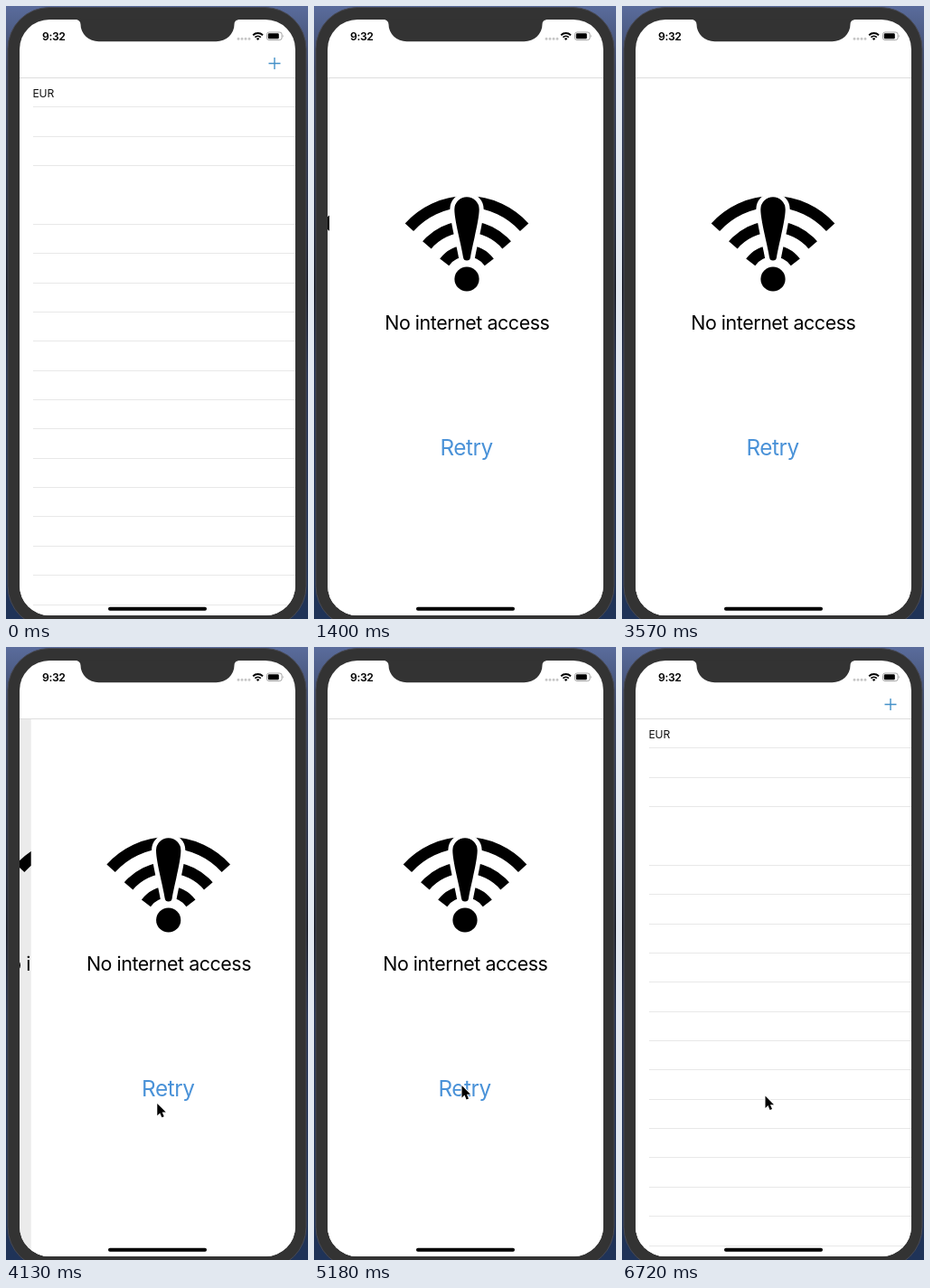
Recreate the animation shown at these times as an HTML page. Size 334x678 px, loop 6.79 s.

```html
<!DOCTYPE html>
<html lang="en">
<head>
<meta charset="utf-8">
<title>Connection retry</title>
<style>
  html, body { margin: 0; width: 100%; height: 100%; overflow: hidden; background: #252e46; }
  svg { display: block; width: 334px; height: 678px; font-family: Inter, Roboto, sans-serif; font-optical-sizing: none; }
  .clock { font-size: 12.2px; font-weight: 600; letter-spacing: -.03em; }
  .row { font-size: 12.1px; letter-spacing: -.015em; }
  .message { font-size: 21.4px; letter-spacing: -.0205em; text-anchor: middle; }
  .retry { font-size: 24.3px; letter-spacing: -.018em; text-anchor: middle; fill: #4a92d8; opacity: var(--press, 1); }
</style>
</head>
<body>
<svg viewBox="0 0 334 678">
  <defs>
    <linearGradient id="wallpaper" x2="0" y2="1">
      <stop offset="0" stop-color="#5a6c9c"/>
      <stop offset=".1" stop-color="#3c4868"/>
      <stop offset=".35" stop-color="#222a40"/>
      <stop offset=".46" stop-color="#141824"/>
      <stop offset=".6" stop-color="#263455"/>
      <stop offset="1" stop-color="#1f3358"/>
    </linearGradient>
    <clipPath id="screen"><rect x="15" y="15" width="305" height="659" rx="33"/></clipPath>
    <clipPath id="content"><rect x="15" y="80" width="305" height="594"/></clipPath>

    <g id="list">
      <rect x="15" y="80" width="305" height="594" fill="#fff"/>
      <text class="row" x="29.5" y="100.5" fill="#111">EUR</text>
      <path id="rules" stroke="#e8e8e8"/>
    </g>

    <g id="error">
      <rect x="15" y="80" width="305" height="594" fill="#fff"/>
      <g id="arcs" fill="none" stroke="#000" stroke-width="12.6"></g>
      <g stroke="#fff" stroke-width="10" paint-order="stroke">
        <path d="M153.3 225a13.7 13.7 0 0 1 27.4 0C180.7 237 173 265 171 278Q170.5 281.5 167 281.5T163 278C161 265 153.3 237 153.3 225Z"/>
        <circle cx="167" cy="302" r="13.6"/>
      </g>
      <text class="message" x="167.3" y="358">No internet access</text>
      <text class="retry" x="166.6" y="497">Retry</text>
    </g>
  </defs>

  <rect width="334" height="678" fill="url(#wallpaper)"/>
  <rect x="2" y="1.5" width="330" height="686" rx="46" fill="#333" stroke="#484a55"/>

  <g clip-path="url(#screen)">
    <rect x="15" y="15" width="305" height="659" fill="#fff"/>
    <g clip-path="url(#content)">
      <use id="under"/>
      <rect id="dim" x="15" y="80" width="305" height="594"/>
      <use id="over"/>
    </g>
    <path d="M15 79.5H320" stroke="#dedede"/>
    <path id="plus" d="M290.5 63.5h13M297 57v13" stroke="#4390c8" stroke-width="1.4"/>
  </g>

  <path d="M75 14.5Q82.5 15 82.5 20.3A20 19 0 0 0 102.5 39.3H232.5A20 19 0 0 0 252.5 20.3Q252.5 15 260 14.5Z" fill="#333"/>

  <text class="clock" x="40" y="37.8">9:32</text>
  <path d="M257 36.3H270" stroke="#c6c6c6" stroke-width="3" stroke-linecap="round" stroke-dasharray="0 4"/>
  <g fill="none" stroke="#000" stroke-width="1.9">
    <path d="M273.2 32.2a7.8 7.8 0 0 1 10.8 0M275.4 34.6a4.7 4.7 0 0 1 6.4 0"/>
    <path d="M276.8 36l1.8 1.9 1.8-1.9q-1.8-1.4-3.6 0z" fill="#000" stroke="none"/>
  </g>
  <rect x="288.5" y="29" width="16.6" height="8.6" rx="2.4" fill="#fff" stroke="#999" stroke-width=".9"/>
  <rect x="289.8" y="30.3" width="12" height="6" rx="1.2"/>
  <path d="M306.2 31.8q1.4 1.5 0 3z" fill="#999"/>
  <rect x="113" y="664.8" width="109" height="3.9" rx="1.95"/>

  <path id="cursor" d="M0 0V13.4L3 10.6 5.1 15.4 7.5 14.4 5.4 9.7H9.5Z" stroke="#fff" stroke-width="1.8" paint-order="stroke"/>
</svg>

<script>
const LOOP = 6790, STEP = 70, WIDTH = 305;
const PUSH_TIME = 500, STIFFNESS = Math.sqrt(1000 / 3) / 1000;

const pushes = [
  { at: 504, from: 'list', to: 'error' },
  { at: 1010, from: 'error', to: 'error' },
  { at: 3858, from: 'error', to: 'error', press: 3710 },
  { at: 4364, from: 'error', to: 'error' },
  { at: 5883, from: 'error', to: 'list', press: 5740 }
];

// time, x, y of the pointer tip
const pointerPath = [
  [3640, 0, 560], [3850, 166, 504], [4620, 169.5, 506.5], [4900, 181, 482],
  [5110, 181, 482], [5250, 146, 488], [5390, 159.5, 495],
  [6510, 159.5, 495], [6720, 158.5, 496.5]
];

const $ = id => document.getElementById(id);
const clamp = v => Math.max(0, Math.min(1, v));

function buildShapes() {
  let rules = '';
  for (let i = 0; i < 18; i++) {
    if (i !== 3) rules += `M30 ${Math.round(111.4 + i * 32.36) + .5}H320`;
  }
  $('rules').setAttribute('d', rules);

  const arcs = [[85.6, 42], [58, 40.5], [31, 37]];
  $('arcs').innerHTML = arcs.map(([r, degrees]) => {
    const angle = degrees * Math.PI / 180;
    const dx = r * Math.cos(angle), y = 302 - r * Math.sin(angle);
    return `<path d="M${167 - dx} ${y}A${r} ${r} 0 0 1 ${167 + dx} ${y}"/>`;
  }).join('');
}

// critically damped spring
function spring(ms) {
  if (ms <= 0) return 0;
  if (ms >= PUSH_TIME) return 1;
  const x = STIFFNESS * ms;
  return 1 - (1 + x) * Math.exp(-x);
}

function place(id, page, x) {
  $(id).setAttribute('href', '#' + page);
  $(id).setAttribute('transform', `translate(${x})`);
}

function drawPages(t) {
  const push = pushes.findLast(p => t >= (p.press ?? p.at)) ?? pushes[0];
  const p = spring(t - push.at);
  const plusAlpha = (push.from === 'list' ? 1 - p : 0) + (push.to === 'list' ? p : 0);
  const press = push.press ? .2 + .8 * clamp((t - push.at) / 470) : 1;

  place('under', push.from, -.3 * WIDTH * p);
  place('over', push.to, WIDTH * (1 - p));
  $('under').style.setProperty('--press', press);
  $('dim').setAttribute('opacity', .09 * p ** 3);
  $('plus').setAttribute('opacity', plusAlpha);
}

function drawPointer(t) {
  const next = pointerPath.findIndex(k => k[0] > t);
  $('cursor').style.display = next === 0 ? 'none' : '';
  if (next === 0) return;
  const b = next < 0 ? pointerPath.at(-1) : pointerPath[next];
  const a = next < 0 ? b : pointerPath[next - 1];
  const k = a === b ? 0 : (t - a[0]) / (b[0] - a[0]);
  const mix = i => a[i] + (b[i] - a[i]) * k;
  $('cursor').setAttribute('transform', `translate(${mix(1)} ${mix(2)})`);
}

const start = performance.now();

function frame() {
  const elapsed = (performance.now() - start) % LOOP;
  const t = Math.floor(elapsed / STEP) * STEP;
  drawPages(t);
  drawPointer(t);
  requestAnimationFrame(frame);
}

buildShapes();
frame();
</script>
</body>
</html>
```
